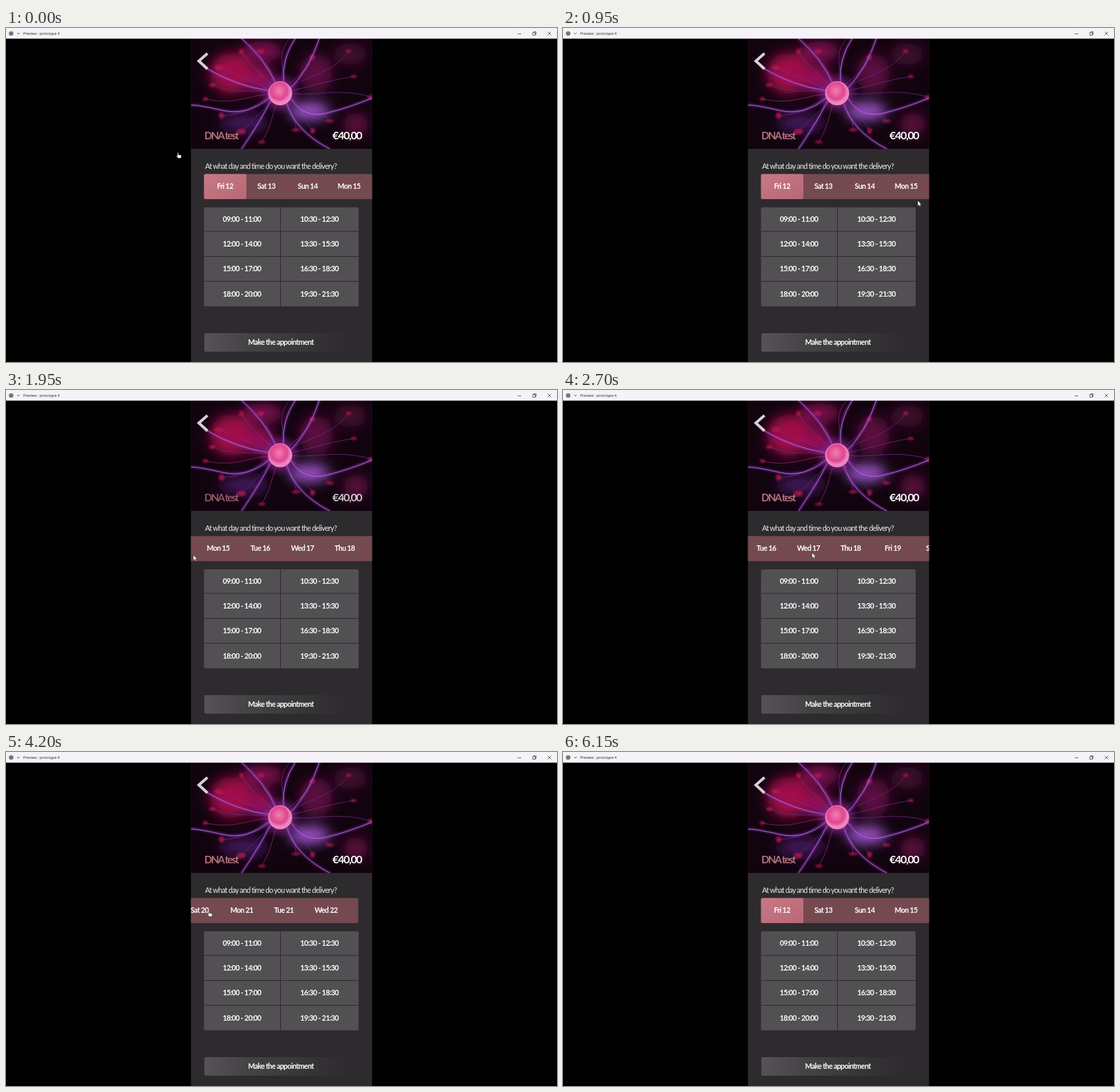
Recreate the animation shown at these times as an HTML page. Size 800 px wide and 486 px high, loop 7450 ms.

```html
<!DOCTYPE html>
<html lang="en">
<head>
<meta charset="utf-8">
<title>Delivery picker</title>
<style>
html, body { margin: 0; width: 100%; height: 100%; overflow: hidden; background: #000; }
svg { display: block; width: 800px; height: 486px; }
text { font-family: Lato, "Open Sans", sans-serif; fill: #fff; }
.label { font-size: 10.6px; font-weight: 700; letter-spacing: -.62px; text-anchor: middle; }
.bar { font: 5.4px "Open Sans", sans-serif; fill: #222; }
.ask { font-size: 10.8px; letter-spacing: -.74px; fill: #eee; }
.title { font-size: 15px; letter-spacing: -1.7px; font-weight: 700; fill: #b0727b; }
.price { font-size: 16px; letter-spacing: -1.3px; font-weight: 700; }
</style>
</head>
<body>
<svg viewBox="0 0 800 486">
  <defs>
    <clipPath id="panel"><rect x="268.500" y="15" width="263" height="471"/></clipPath>
    <clipPath id="photo"><rect x="268.500" y="15" width="263" height="161"/></clipPath>
    <filter id="soft" x="-60%" y="-60%" width="220%" height="220%"><feGaussianBlur stdDeviation="9"/></filter>
    <filter id="glow" x="-50%" y="-50%" width="200%" height="200%"><feGaussianBlur stdDeviation="1.8"/></filter>
    <radialGradient id="cell" cx=".45" cy=".4">
      <stop offset="0" stop-color="#f27fae"/><stop offset=".7" stop-color="#df4690"/><stop offset="1" stop-color="#ee86c2"/>
    </radialGradient>
    <radialGradient id="halo">
      <stop offset=".3" stop-color="#c838a8" stop-opacity=".8"/><stop offset="1" stop-color="#7020a0" stop-opacity="0"/>
    </radialGradient>
    <linearGradient id="button">
      <stop offset="0" stop-color="#555356"/><stop offset=".3" stop-color="#444245"/><stop offset=".93" stop-color="#2d2b2e"/>
    </linearGradient>
    <linearGradient id="chosen" x2="1" y2="1">
      <stop offset="0" stop-color="#c87985"/><stop offset="1" stop-color="#b66874"/>
    </linearGradient>
  </defs>

  <rect width="800" height="486"/>
  <rect x="268.500" y="15" width="263" height="471" fill="#2d2b2e"/>
  <g id="image" clip-path="url(#photo)"></g>
  <rect width="800" height="15.500" fill="#f5f3f7"/>
  <circle cx="7.500" cy="8" r="3.300" fill="#777"/>
  <g fill="none" stroke="#444" stroke-width=".8">
    <path d="M16 7l2 2 2-2M743 8.500h5M786.500 5.500l5 5m0-5l-5 5"/>
    <path d="M764.800 6.800h3.700v3.700h-3.700zM766 6.600V5.500h3.700v3.800h-1"/>
  </g>
  <text class="bar" x="25" y="10">Preview : prototype 4</text>

  <path d="M292.500 37L280 48l12.500 11.500" fill="none" stroke="#d6d0d8" stroke-width="4"/>
  <g id="heading">
    <text class="title" x="288" y="161.500">DNA test</text>
    <text class="price" x="474" y="161.500">€40,00</text>
  </g>
  <text class="ask" x="289" y="205">At what day and time do you want the delivery?</text>
  <g clip-path="url(#panel)"><g id="strip"></g></g>
  <g id="slots"></g>
  <rect x="288" y="444" width="224" height="27" rx="2" fill="url(#button)"/>
  <text class="label" x="399" y="461">Make the appointment</text>

  <g id="cursor" fill="#fff" stroke="#222" stroke-width=".6" stroke-linejoin="round">
    <path id="arrow" d="M0 0v8l1.800-1.600 1.300 2.700 1.400-.7-1.300-2.500h2.500z"/>
    <path id="hand" d="M0 .6Q.7-.3 1.400 .6V3.200l3.300.8q.9.300.8 1.300L5 8.500H1L-1.800 5.300q0-1 1.800-.1z"/>
  </g>
</svg>
<script>
const $ = id => document.getElementById(id);
const LOOP = 7450, STEP = 50;

const label = (s, x, y) => `<text class="label" x="${x}" y="${y}">${s}</text>`;

function seeded(seed) {
  return () => (seed = (seed * 16807) % 2147483647) / 2147483647;
}

function drawImage() {
  const rnd = seeded(91), cx = 398, cy = 95;
  const blob = (x, y, rx, ry, c) => `<ellipse cx="${x}" cy="${y}" rx="${rx}" ry="${ry}" fill="${c}"/>`;
  const line = (d, c, w) => `<path d="${d}" stroke="${c}" stroke-width="${w}"/>`;
  let out = '<rect x="268" y="15" width="264" height="161" fill="#12040f"/><g filter="url(#soft)">' +
    blob(328, 66, 32, 30, '#a00c48') + blob(372, 34, 30, 14, '#7d0b50') +
    blob(370, 75, 20, 20, '#960f58') + blob(450, 66, 24, 28, '#5c0c3f') +
    blob(500, 38, 24, 16, '#43082f') + blob(345, 138, 34, 14, '#3f1257') +
    blob(440, 121, 30, 13, '#9a55c8') + blob(508, 140, 18, 16, '#5f0d40') + '</g>';

  let thin = '', spots = '';
  for (let i = 0; i < 16; i++) {
    const a = (i + rnd() * .6) / 16 * Math.PI * 2, r = 75 + rnd() * 60, bend = (rnd() - .5) * .6;
    const at = (k, da) => `${(cx + Math.cos(a + da) * k).toFixed(1)} ${(cy + Math.sin(a + da) * k * .7).toFixed(1)}`;
    thin += line(`M${at(15, 0)}C${at(r * .35, bend)} ${at(r * .65, -bend)} ${at(r, bend * .4)}`,
      ['#7a2c94', '#95306f', '#593488'][i % 3], .7);
    const [x, y] = at(r, bend * .4).split(' ');
    spots += blob(x, y, 3 + rnd() * 4, 2 + rnd() * 2.5, '#b8124e');
  }
  const main = [
    'M382 102Q350 128 315 120T269 112', 'M384 106Q370 135 342 176',
    'M414 103Q432 132 465 124T531 102', 'M408 110Q420 150 470 176',
    'M391 79Q378 48 342 15', 'M403 78Q400 45 420 15',
    'M413 88Q440 60 455 15', 'M382 91Q335 85 290 58'
  ];
  const bright = (c, w) => main.map(d => line(d, c, w)).join('');
  out += `<g opacity=".8" filter="url(#glow)">${spots}</g><g fill="none" stroke-linecap="round">${thin}` +
    `<g filter="url(#glow)" opacity=".6">${bright('#8a35c4', 3)}</g>${bright('#b871cf', .9)}</g>`;
  out += '<circle cx="398" cy="95" r="32" fill="url(#halo)"/>' +
    '<circle cx="398" cy="95" r="17" fill="url(#cell)" stroke="#f7a3cb" stroke-width=".8"/>';
  $('image').innerHTML = out;
}

function drawStrip() {
  const days = 'Fri 12,Sat 13,Sun 14,Mon 15,Tue 16,Wed 17,Thu 18,Fri 19,Sat 20,Mon 21,Tue 21,Wed 22'.split(',');
  const place = i => i < 4 ? 318 + i * 60 : 498 + (i - 3) * 61.2;
  $('strip').innerHTML = '<rect x="287.500" y="212.500" width="747" height="36.500" rx="2" fill="#744a50"/>' +
    '<rect x="287.500" y="212.500" width="61.500" height="36.500" rx="2" fill="url(#chosen)"/>' +
    days.map((d, i) => label(d, place(i), 234)).join('');
}

function drawSlots() {
  const times = ['09:00 - 11:00', '10:30 - 12:30', '12:00 - 14:00', '13:30 - 15:30',
    '15:00 - 17:00', '16:30 - 18:30', '18:00 - 20:00', '19:30 - 21:30'];
  $('slots').innerHTML = '<rect x="287.500" y="261" width="224.500" height="144" rx="2" fill="#525053"/>' +
    '<path d="M398.500 261v144M288 296h224M288 332.500h224M288 368.500h224" stroke="#2d2b2e"/>' +
    times.map((s, i) => label(s, i % 2 ? 455 : 342.5, 282 + (i >> 1) * 36.2)).join('');
}

// time, x, y of the pointer tip
const pointer = [
  [0, 249, 181], [400, 222, 200], [750, 257, 222], [950, 515, 251], [1250, 505, 268],
  [1550, 462, 245], [1950, 272, 240], [2250, 198, 236], [2350, 200, 236], [3000, 500, 237],
  [3100, 440, 234], [3400, 325, 232], [3750, 194, 235], [3850, 180, 235], [4200, 294, 231],
  [4300, 298, 231], [5250, 668, 228], [5350, 671, 228], [5700, 430, 257], [6000, 187, 249], [6150, -11, 249]
];
// time, strip offset
const scroll = [
  [0, 0], [1550, 0], [1950, -190], [2250, -264], [3100, -264], [3400, -379.5], [3750, -510],
  [3850, -523], [4300, -523], [5250, -112], [5350, -96], [5600, -52], [5900, -14], [6100, 0]
];
const handSpans = [[0, 500], [4000, 4500]];
const dimSpans = [[1600, 2350], [3550, 3950], [4650, 5900]];

function sample(keys, t) {
  const n = keys.findIndex(k => k[0] > t);
  if (n < 0) return keys[keys.length - 1].slice(1);
  const a = keys[n - 1], b = keys[n], k = (t - a[0]) / (b[0] - a[0]);
  return a.slice(1).map((v, i) => v + (b[i + 1] - v) * k);
}
const within = (spans, t) => spans.some(([a, b]) => t >= a && t < b);

function render(now) {
  const t = Math.floor((now % LOOP) / STEP) * STEP;
  const [x, y] = sample(pointer, t), hand = within(handSpans, t);
  $('cursor').setAttribute('transform', `translate(${x} ${y})`);
  $('hand').style.display = hand ? '' : 'none';
  $('arrow').style.display = hand ? 'none' : '';
  $('strip').setAttribute('transform', `translate(${sample(scroll, t)[0]} 0)`);
  $('heading').style.opacity = within(dimSpans, t) ? .78 : 1;
}

drawImage();
drawStrip();
drawSlots();
const start = performance.now();
function tick() {
  render(performance.now() - start);
  requestAnimationFrame(tick);
}
tick();
</script>
</body>
</html>
```
